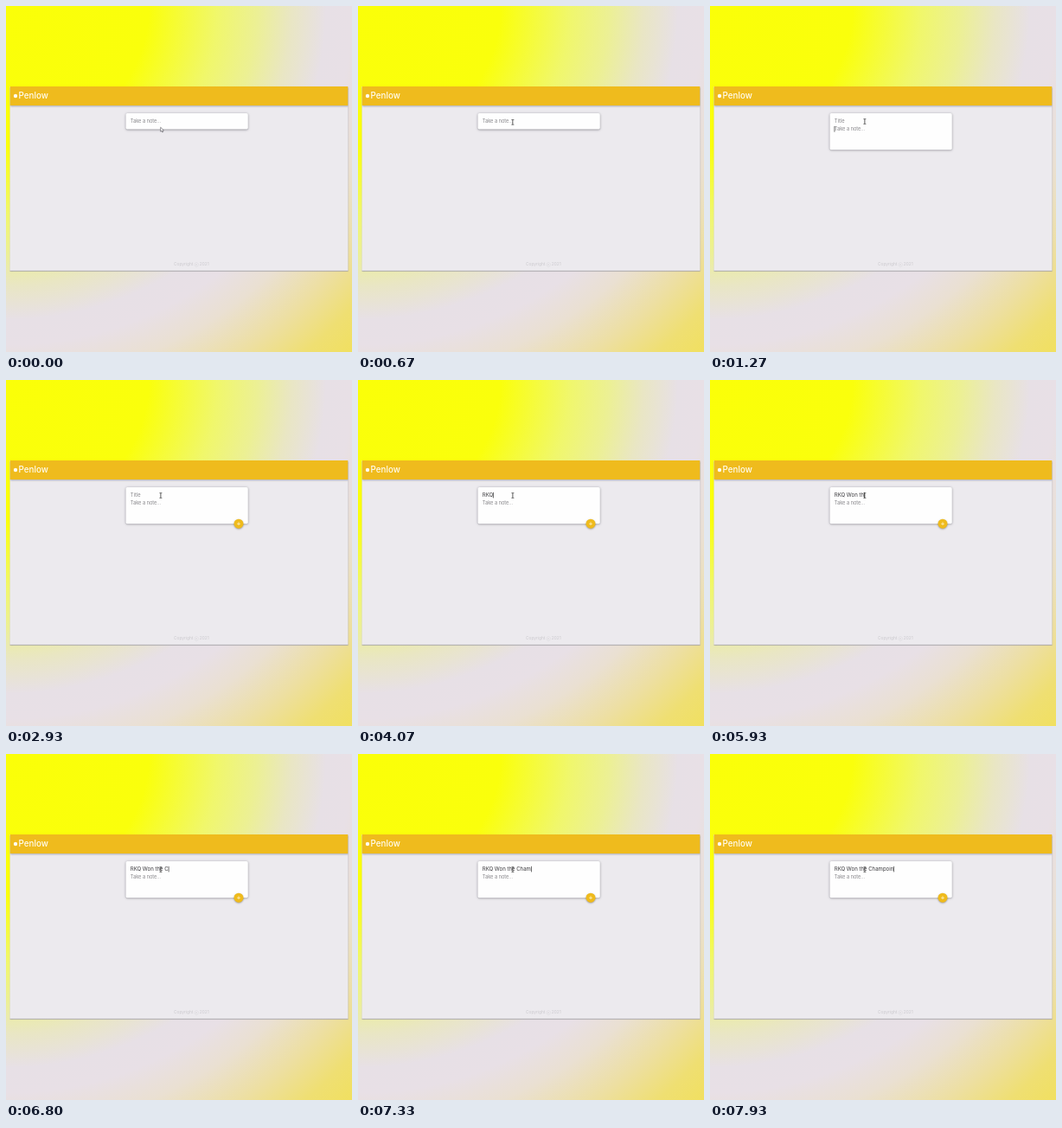
Recreate the animation shown at these times as an HTML page with a canvas. Size 400x400 px, loop 8 s.

```html
<!DOCTYPE html>
<html lang="en">
<head>
<meta charset="utf-8">
<title>Note app</title>
<style>
html, body { margin: 0; width: 100%; height: 100%; overflow: hidden; }
canvas { display: block; width: 400px; height: 400px; }
</style>
</head>
<body>
<canvas id="stage"></canvas>
<script>
const LOOP = 8000;
const FRAME = 1000 / 15;
const OPEN = 1230;          // the card expands
const FOCUS_TITLE = 3130;   // the caret moves to the title
const TITLE = 'RKQ Won the Champoin';
const KEY_TIMES = [3600, 3800, 4050, 4350, 4600, 4850, 5070, 5400, 5600, 5800,
  6050, 6300, 6600, 6900, 7050, 7250, 7400, 7550, 7700, 7850];
const GOLD = '#efbb1d';
const SANS = 'Inter, "Open Sans", sans-serif';

const canvas = document.getElementById('stage');
const ctx = canvas.getContext('2d');
const dpr = window.devicePixelRatio || 1;
canvas.width = canvas.height = 400 * dpr;

const clamp = v => Math.min(1, Math.max(0, v));
const easeInOut = p => p * p * (3 - 2 * p);
const easeOut = p => 1 - (1 - p) ** 3;

function rect(x, y, w, h, color) {
  ctx.fillStyle = color;
  ctx.fillRect(x, y, w, h);
}

function circle(x, y, r, color) {
  ctx.fillStyle = color;
  ctx.beginPath();
  ctx.arc(x, y, r, 0, 7);
  ctx.fill();
}

function text(str, x, y, size, color, weight = 400) {
  ctx.font = `${weight} ${size}px ${SANS}`;
  ctx.fillStyle = color;
  ctx.fillText(str, x, y);
  return ctx.measureText(str).width;
}

function withShadow(color, blur, dy, draw) {
  ctx.save();
  ctx.shadowColor = color;
  ctx.shadowBlur = blur * dpr;
  ctx.shadowOffsetY = dy * dpr;
  draw();
  ctx.restore();
}

function drawBackdrop() {
  const stops = [
    [0, '#fbff08'], [165, '#faff0c'], [205, '#f5fb3c'], [245, '#f0f76c'],
    [290, '#ecf094'], [330, '#e9e6c4'], [370, '#e7e0e6'], [400, '#e8e0e6'],
    [440, '#eae0d2'], [490, '#eddfa2'], [535, '#efdf72'], [580, '#f1e05c']
  ];
  const g = ctx.createRadialGradient(0, 0, 0, 0, 0, 580);
  for (const [r, color] of stops) g.addColorStop(r / 580, color);
  ctx.save();
  ctx.scale(1, 0.98);
  rect(0, 0, 400, 410, g);
  ctx.restore();
}

function drawWindow() {
  withShadow('rgba(50,50,60,.6)', 1.5, 0.6, () => rect(4.5, 93, 391, 213.3, '#eceaee'));
  rect(4.5, 305.9, 391, 0.7, '#a3a1a5');
  ctx.save();
  ctx.beginPath();
  ctx.rect(4.5, 93, 391, 213);
  ctx.clip();
  withShadow('rgba(0,0,0,.28)', 2, 0.6, () => rect(4.5, 93, 391, 22, GOLD));
  ctx.restore();
  circle(11, 104, 2.2, '#fffdf2');
  text('Penlow', 14.6, 107.2, 9.8, '#fffdf2', 500);
  text('Copyright ⓒ 2021', 194, 299.6, 4.8, '#cbc9ce');
}

function drawCard(open) {
  withShadow('rgba(70,70,80,.6)', 2.5, 0.6, () => {
    ctx.fillStyle = '#fefefe';
    ctx.beginPath();
    ctx.roundRect(138.5, 124, 141.3, open ? 42.2 : 18.6, 1.8);
    ctx.fill();
  });
}

function drawCaret(x, y) {
  rect(x, y - 5.2, 0.7, 6.6, '#333');
}

function drawFields(t, open) {
  const gray = '#858488';
  if (!open) {
    text('Take a note...', 143.8, 134.9, 5.6, gray);
    return;
  }
  const typed = TITLE.slice(0, KEY_TIMES.filter(k => k <= t).length);
  let end = 143.6;
  if (typed) end += text(typed, 143.8, 135, 6.05, '#3a393d') + 0.3;
  else text('Title', 143.8, 135, 5.75, gray);
  text('Take a note...', 143.8, 144.2, 5.6, gray);

  const inTitle = t >= FOCUS_TITLE;
  const lastAction = Math.max(inTitle ? FOCUS_TITLE : OPEN, ...KEY_TIMES.filter(k => k <= t));
  if ((t - lastAction) % 1000 < 500) drawCaret(inTitle ? end : 143.6, inTitle ? 135 : 144.2);
}

function drawAddButton(t) {
  const scale = easeOut(clamp((t - OPEN - 60) / 225));
  if (!scale) return;
  ctx.save();
  ctx.translate(269, 166.2);
  ctx.scale(scale, scale);
  withShadow('rgba(0,0,0,.35)', 2, 0.7, () => circle(0, 0, 5.5, GOLD));
  rect(-1.9, -0.35, 3.8, 0.7, '#fff6da');
  rect(-0.35, -1.9, 0.7, 3.8, '#fff6da');
  ctx.restore();
}

function drawArrow(x, y) {
  const points = [[0, 0], [0, 5], [1.2, 4], [2, 5.8], [2.9, 5.4], [2.1, 3.7], [3.7, 3.6]];
  ctx.beginPath();
  for (const [dx, dy] of points) ctx.lineTo(x + dx, y + dy);
  ctx.closePath();
  ctx.fillStyle = '#fff';
  ctx.strokeStyle = '#66656a';
  ctx.lineWidth = 0.7;
  ctx.fill();
  ctx.stroke();
}

function drawBeam(x, y) {
  rect(x - 0.4, y - 2.9, 0.8, 5.8, '#333');
  rect(x - 1.5, y - 3.1, 3, 0.7, '#444');
  rect(x - 1.5, y + 2.4, 3, 0.7, '#444');
}

function drawPointer(t) {
  const p = easeInOut(clamp((t - 200) / 600));
  const x = 178.7 + 0.2 * p;
  const y = 140.2 - 6.7 * p;
  if (y > 138) drawArrow(x, y);
  else drawBeam(x, y);
}

function draw(now) {
  const t = Math.floor((now % LOOP) / FRAME + 0.01) * FRAME;
  const open = t >= OPEN;
  ctx.setTransform(dpr, 0, 0, dpr, 0, 0);
  drawBackdrop();
  drawWindow();
  drawCard(open);
  drawFields(t, open);
  drawAddButton(t);
  drawPointer(t);
}

const start = performance.now();
function tick() {
  draw(performance.now() - start);
  requestAnimationFrame(tick);
}
tick();
</script>
</body>
</html>
```
